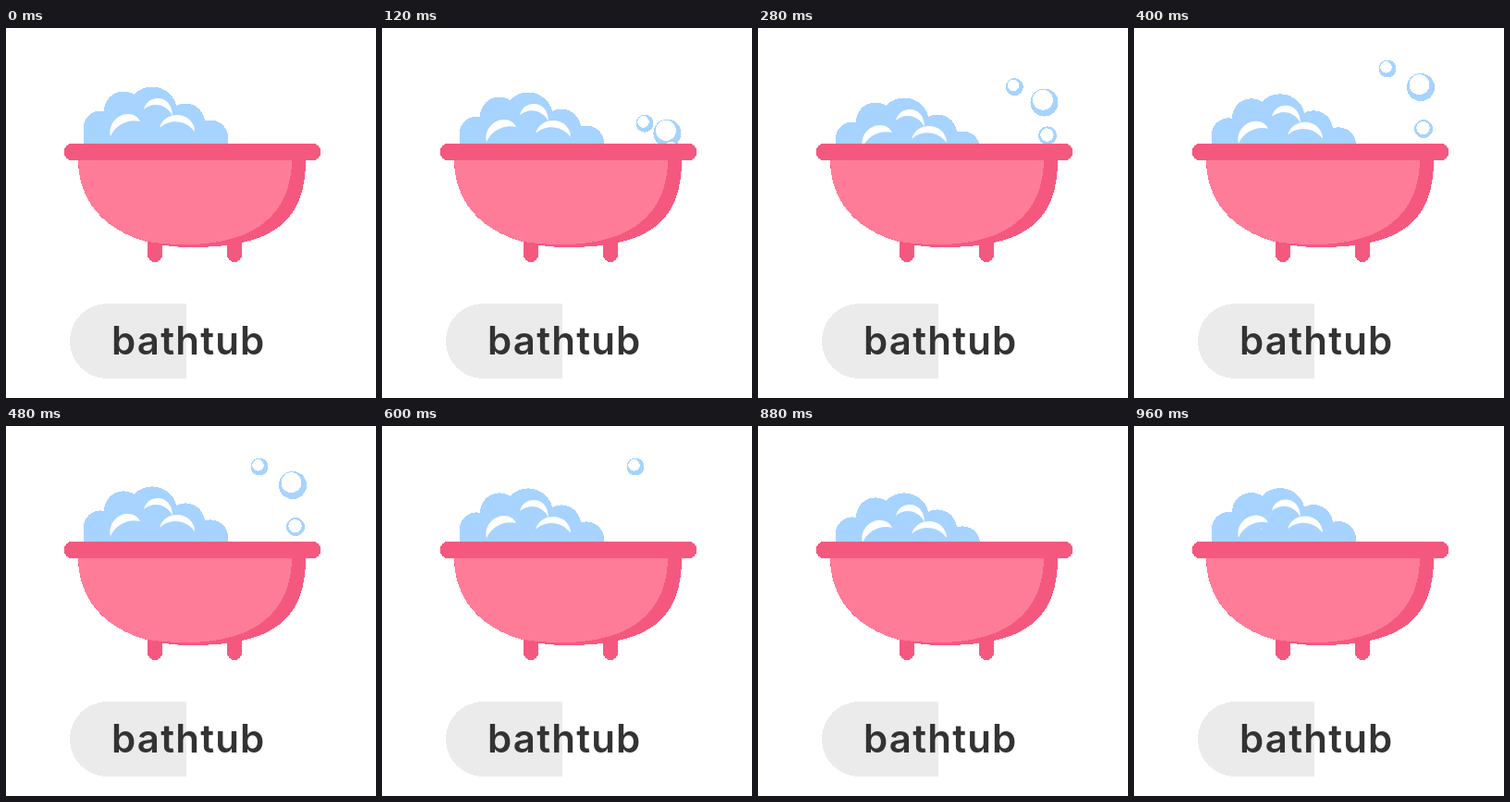
An HTML page that plays this animation: 400x400 px, repeating every 1 s.

```html
<!DOCTYPE html>
<html lang="en">
<head>
<meta charset="utf-8">
<title>Bathtub</title>
<style>
  html, body { margin: 0; width: 100%; height: 100%; overflow: hidden; background: #fff; }
  svg { display: block; width: 100%; height: 100%; shape-rendering: crispEdges; }
  text { font: 600 42px Inter, "Open Sans", sans-serif; letter-spacing: 1.2px; fill: #333; }
</style>
</head>
<body>
<svg viewBox="0 0 400 400">
  <g id="bubbles"></g>

  <g id="foam">
    <g fill="#a6d3ff">
      <circle cx="102" cy="107.500" r="18"/>
      <circle cx="127" cy="89.500" r="21"/>
      <circle cx="158" cy="90.500" r="27"/>
      <circle cx="194" cy="102.500" r="21"/>
      <circle cx="221" cy="118.500" r="19"/>
      <path d="M84 108H200L240 119V142H84Z"/>
    </g>
    <g fill="#fff" shape-rendering="auto">
      <path d="M113 117C110 104 121 92.500 132 93C138 93 143 96 145 101C133 98 119 104 113 117Z"/>
      <path d="M149 88C151 80 157 76 164 76C173 76 180 83 180 95C174 83 160 79 149 88Z"/>
      <path d="M166 108C169 98 177 94 185 94C196 94 204 102 204 112C195 100 178 97 166 108Z"/>
    </g>
  </g>

  <!-- hides whatever is still inside the tub -->
  <rect x="60" y="143" width="284" height="100" fill="#fff"/>
  <g fill="#f5587f">
    <rect x="153" y="222" width="16" height="31" rx="8"/>
    <rect x="239" y="222" width="16" height="31" rx="8"/>
    <path d="M78 142C78 200 125 237 201 237C293 237 324 206 324 142Z"/>
  </g>
  <path d="M78 142H309C309 199 271 234 195 234C178 234 165 233 149.700 230.300C104.400 217.200 78 185.500 78 142Z" fill="#ff7c98"/>
  <rect x="63" y="125" width="277" height="18" rx="8" fill="#f5587f"/>

  <path d="M195 298H109.500A40.500 40.500 0 0 0 109.500 379H195Z" fill="#ebebeb"/>
  <text x="114" y="353">bathtub</text>
</svg>

<script>
  const LOOP = 1000, STEP = 40, RISE = 400, BOB = 500, DROP = 12.2;
  const foam = document.getElementById("foam");
  const layer = document.getElementById("bubbles");

  // from and to: centre; r: radius; shine: offset and radius; end: time of the pop
  const bubbles = [
    { from: [290, 138], to: [274, 44], r: 9.5, shine: [-1.5, -1.7, 6.3], end: 640 },
    { from: [307.5, 143], to: [310, 64], r: 15, shine: [-1.5, -2.8, 11], end: 560 },
    { from: [313, 144], to: [313, 109], r: 10, shine: [-0.5, -0.8, 7.2], end: 560 }
  ];

  function circle(parent, cx, cy, r, fill) {
    const el = document.createElementNS("http://www.w3.org/2000/svg", "circle");
    Object.entries({ cx, cy, r, fill }).forEach(([k, v]) => el.setAttribute(k, v));
    parent.append(el);
  }

  for (const b of bubbles) {
    b.el = document.createElementNS("http://www.w3.org/2000/svg", "g");
    circle(b.el, 0, 0, b.r, "#a6d3ff");
    circle(b.el, ...b.shine, "#fff");
    layer.append(b.el);
  }

  const move = (el, x, y) =>
    el.setAttribute("transform", `translate(${x.toFixed(2)} ${y.toFixed(2)})`);

  // sinks with a soft start and stop, then speeds up on the way back
  function foamY(t) {
    const p = (t % BOB) / BOB, low = 0.48;
    if (p < low) {
      const q = p / low;
      return DROP * (q ** 2.2 / (q ** 2.2 + (1 - q) ** 2.2));
    }
    return DROP * (1 - ((p - low) / (1 - low)) ** 2.1);
  }

  function draw(t) {
    move(foam, 0, foamY(t));
    const left = (1 - Math.min(t / RISE, 1)) ** 1.3;
    for (const b of bubbles) {
      const [x, y] = b.to.map((v, i) => v + (b.from[i] - v) * left);
      b.el.setAttribute("visibility", t > 0 && t < b.end ? "visible" : "hidden");
      move(b.el, x, y);
    }
  }

  const start = performance.now();
  function tick() {
    const t = (performance.now() - start) % LOOP;
    draw(Math.floor(t / STEP) * STEP);
    requestAnimationFrame(tick);
  }
  draw(0);
  requestAnimationFrame(tick);
</script>
</body>
</html>
```
